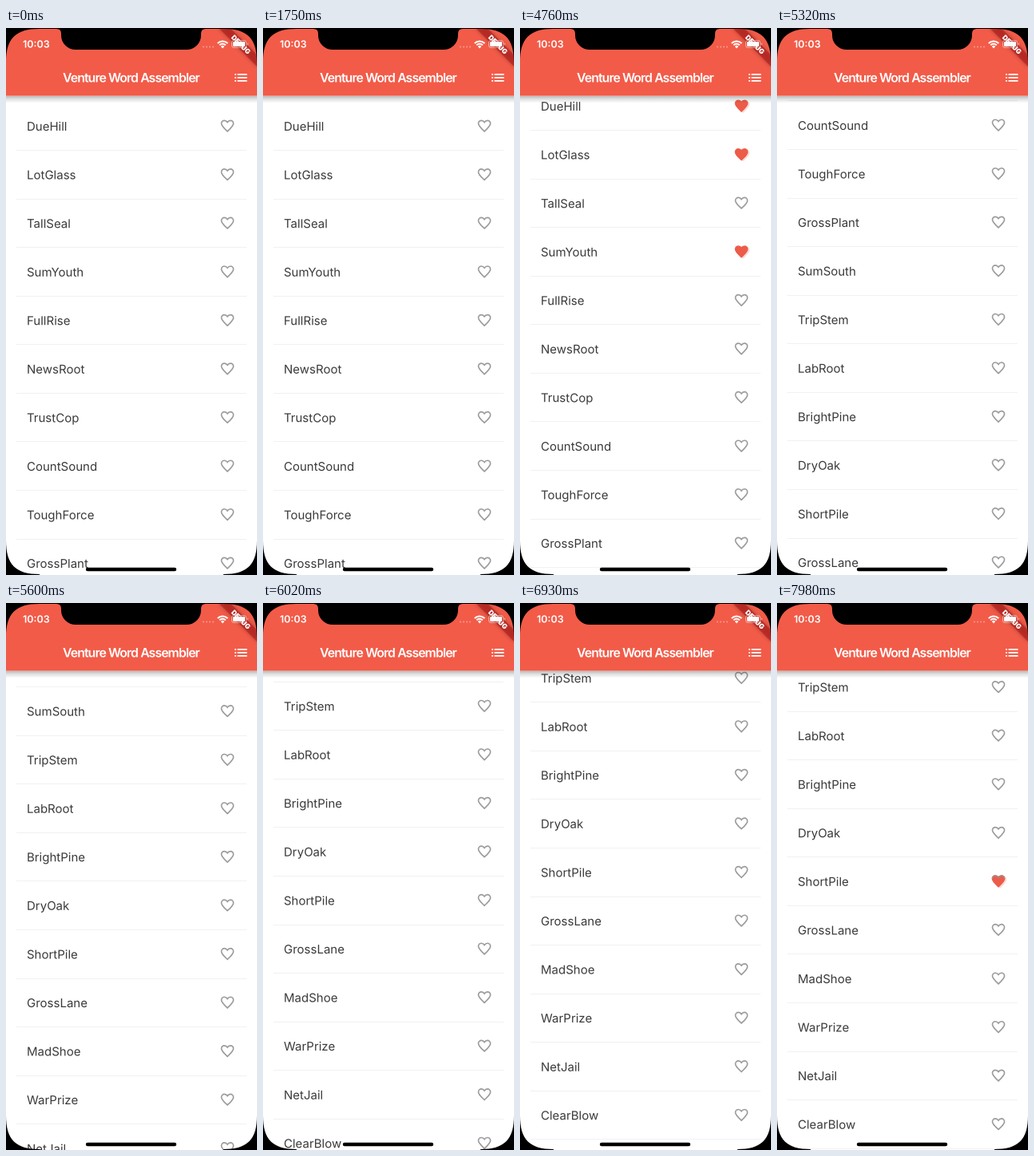
Animation, 314 px wide and 682 px high, one loop 8000 ms. Source, as an HTML page with a canvas:

```html
<!DOCTYPE html>
<html lang="en">
<head>
<meta charset="utf-8">
<title>Name list</title>
<style>
  html, body { margin: 0; width: 100%; height: 100%; overflow: hidden; background: #000; }
  canvas { display: block; }
</style>
</head>
<body>
<canvas id="stage" width="314" height="682"></canvas>
<script>
const W = 314, H = 682, LOOP = 8000, TICK = 70;
const PITCH = 60.56, FIRST_ROW = 122.3, HEADER = 84.6;
const RED = '#f25b48', GRAY = '#9b9b9b';
const FONT = 'Inter, "Open Sans", sans-serif';
const ctx = document.getElementById('stage').getContext('2d');

const names = ('DueHill LotGlass TallSeal SumYouth FullRise NewsRoot TrustCop CountSound ' +
  'ToughForce GrossPlant SumSouth TripStem LabRoot BrightPine DryOak ShortPile ' +
  'GrossLane MadShoe WarPrize NetJail ClearBlow SweetPlain').split(' ');

// Row index -> time of the tap that fills its heart
const likes = { 0: 1960, 1: 2730, 3: 3990, 15: 7980 };

const ripples = [
  { from: 1960, to: 2100, x: 261, y: 122, rx: 40, ry: 23 },
  { from: 2730, to: 2940, x: 280, y: 183, rx: 15, ry: 15 },
  { from: 3990, to: 4200, x: 265, y: 303, rx: 35, ry: 23 }
];

// Two upward swipes, then a short pull back: [time, offset]
const scrollKeys = [
  [0, 0], [4690, 0], [4760, 25], [5040, 170], [5180, 275], [5320, 425],
  [5460, 540], [5600, 593], [5810, 595], [5880, 595], [6020, 660],
  [6160, 718], [6230, 730], [6300, 730], [6440, 733.7], [6650, 733.7],
  [6720, 733], [6790, 733], [6860, 715], [6930, 695], [7000, 683.6], [LOOP, 683.6]
];

const heart = new Path2D('M12 20.2C7 15.6 3 12.2 3 8.5C3 6 5 4 7.5 4C9.3 4 11 5 12 6.6' +
  'C13 5 14.7 4 16.5 4C19 4 21 6 21 8.5C21 12.2 17 15.6 12 20.2Z');

function scrollAt(t) {
  const i = scrollKeys.findIndex(key => key[0] >= t);
  if (i < 1) return 0;
  const [t0, y0] = scrollKeys[i - 1], [t1, y1] = scrollKeys[i];
  return y0 + (y1 - y0) * (t - t0) / (t1 - t0);
}

function text(str, x, y, font, color, align = 'left', spacing = 0) {
  ctx.save();
  // An imperceptible skew keeps fractional baselines from snapping to whole pixels
  ctx.transform(1, 0.0005, 0, 1, x, y);
  ctx.font = `${font} ${FONT}`;
  ctx.fillStyle = color;
  ctx.textAlign = align;
  ctx.textRendering = 'geometricPrecision';
  ctx.letterSpacing = spacing + 'px';
  ctx.fillText(str, 0, 0);
  ctx.restore();
}

function rect(x, y, w, h, color, radius = 0) {
  ctx.fillStyle = color;
  ctx.beginPath();
  ctx.roundRect(x, y, w, h, radius);
  ctx.fill();
}

function drawHeart(x, y, color, filled) {
  ctx.save();
  ctx.translate(x, y);
  ctx.scale(0.837, 0.837);
  ctx.translate(-12, -12);
  ctx.lineWidth = 2;
  ctx.strokeStyle = ctx.fillStyle = color;
  if (filled) ctx.fill(heart);
  ctx.stroke(heart);
  ctx.restore();
}

function drawLikedHeart(y, fresh) {
  drawHeart(279, y + 1, '#fbdcd7', true);
  drawHeart(277, y, '#ec5c49', true);
  if (!fresh) return;
  ctx.save();
  ctx.beginPath();
  ctx.rect(266, y - 10, 20, 7);
  ctx.clip();
  drawHeart(277, y, '#a98580', false);
  ctx.restore();
}

function drawList(t) {
  const scroll = scrollAt(t);
  names.forEach((name, i) => {
    const y = FIRST_ROW + i * PITCH - scroll;
    if (y < 40 || y > H + 30) return;
    rect(13, Math.round(y + 29.8), 288, 1, '#f1f1f1');
    text(name, 26, y + 5.7, '400 15px', '#3a3a3a');
    if (t >= likes[i]) drawLikedHeart(y - 0.3, t - likes[i] < TICK);
    else drawHeart(277, y - 0.3, GRAY, false);
  });
}

function drawRipples(t) {
  for (const r of ripples) {
    if (t < r.from || t >= r.to) continue;
    ctx.fillStyle = 'rgba(0,0,0,.035)';
    ctx.beginPath();
    ctx.ellipse(r.x, r.y, r.rx, r.ry, 0, 0, Math.PI * 2);
    ctx.fill();
  }
}

function drawStatusBar() {
  text('10:03', 21, 24.6, '600 12.5px', '#fff');
  for (let i = 0; i < 4; i++) rect(246 + i * 4, 22.5, 2, 2, 'rgba(255,255,255,.4)', 1);

  ctx.strokeStyle = ctx.fillStyle = '#fff';
  ctx.lineWidth = 2;
  for (const r of [5.2, 8.6]) {
    ctx.beginPath();
    ctx.arc(271, 25, r, -Math.PI * 0.76, -Math.PI * 0.24);
    ctx.stroke();
  }
  ctx.beginPath();
  ctx.moveTo(271, 25.5);
  ctx.arc(271, 25, 3, -Math.PI * 0.76, -Math.PI * 0.24);
  ctx.fill();

  ctx.strokeStyle = 'rgba(255,255,255,.5)';
  ctx.lineWidth = 1;
  ctx.beginPath();
  ctx.roundRect(282.5, 15.5, 18, 9, 2.5);
  ctx.stroke();
  rect(284, 17, 15, 6, '#fff', 1.3);
  rect(301.8, 18.5, 1.2, 3, 'rgba(255,255,255,.5)', 0.6);
}

function drawHeader() {
  const shadow = ctx.createLinearGradient(0, HEADER, 0, HEADER + 9);
  shadow.addColorStop(0, 'rgba(0,0,0,.28)');
  shadow.addColorStop(0.45, 'rgba(0,0,0,.12)');
  shadow.addColorStop(1, 'rgba(0,0,0,0)');
  rect(0, HEADER, W, 9, shadow);
  rect(0, 0, W, HEADER, RED);

  text('Venture Word Assembler', 156.5, 67.5, '600 15.8px', '#fff', 'center', -0.9);
  for (const y of [57, 61, 65]) {
    rect(286, y, 2, 1.8, '#fff');
    rect(289.5, y, 12, 1.8, '#fff');
  }
}

function drawBanner() {
  ctx.save();
  ctx.translate(W, 0.5);
  ctx.rotate(Math.PI / 4);
  ctx.shadowColor = 'rgba(0,0,0,.45)';
  ctx.shadowBlur = 5;
  rect(-34, 23.4, 68, 10.1, 'rgba(183,28,28,.63)');
  ctx.shadowColor = 'transparent';
  text('DEBUG', 0, 31.5, '900 8.6px', '#fff', 'center');
  ctx.restore();
}

function drawCorner(x, y, sx, sy) {
  ctx.save();
  ctx.translate(x, y);
  ctx.scale(sx, sy);
  ctx.beginPath();
  ctx.moveTo(-1, -1);
  ctx.lineTo(-1, 42);
  ctx.lineTo(0, 42);
  ctx.bezierCurveTo(0, 12, 12, 0, 42, 0);
  ctx.lineTo(42, -1);
  ctx.fill();
  ctx.restore();
}

function drawNotch() {
  const left = 69, right = 244, top = 1, bottom = 27;
  ctx.beginPath();
  ctx.moveTo(left - 6, top);
  ctx.quadraticCurveTo(left, top, left, top + 6);
  ctx.arcTo(left, bottom, left + 20, bottom, 18);
  ctx.arcTo(right, bottom, right, top, 18);
  ctx.lineTo(right, top + 6);
  ctx.quadraticCurveTo(right, top, right + 6, top);
  ctx.fill();
}

function drawPhone() {
  rect(0, 0, W, 1, '#000');
  drawCorner(0, 1, 1, 1);
  drawCorner(W, 1, -1, 1);
  drawCorner(0, H - 1, 1, -1);
  drawCorner(W, H - 1, -1, -1);
  drawNotch();
  rect(99.8, 672.7, 113.4, 4.6, '#000', 2.3);
}

function draw(now) {
  const t = Math.floor((now % LOOP) / TICK) * TICK;
  rect(0, 0, W, H, '#fff');
  drawRipples(t);
  drawList(t);
  drawHeader();
  drawBanner();
  drawStatusBar();
  drawPhone();
}

const start = performance.now();
function frame() {
  draw(performance.now() - start);
  requestAnimationFrame(frame);
}
frame();
</script>
</body>
</html>
```
